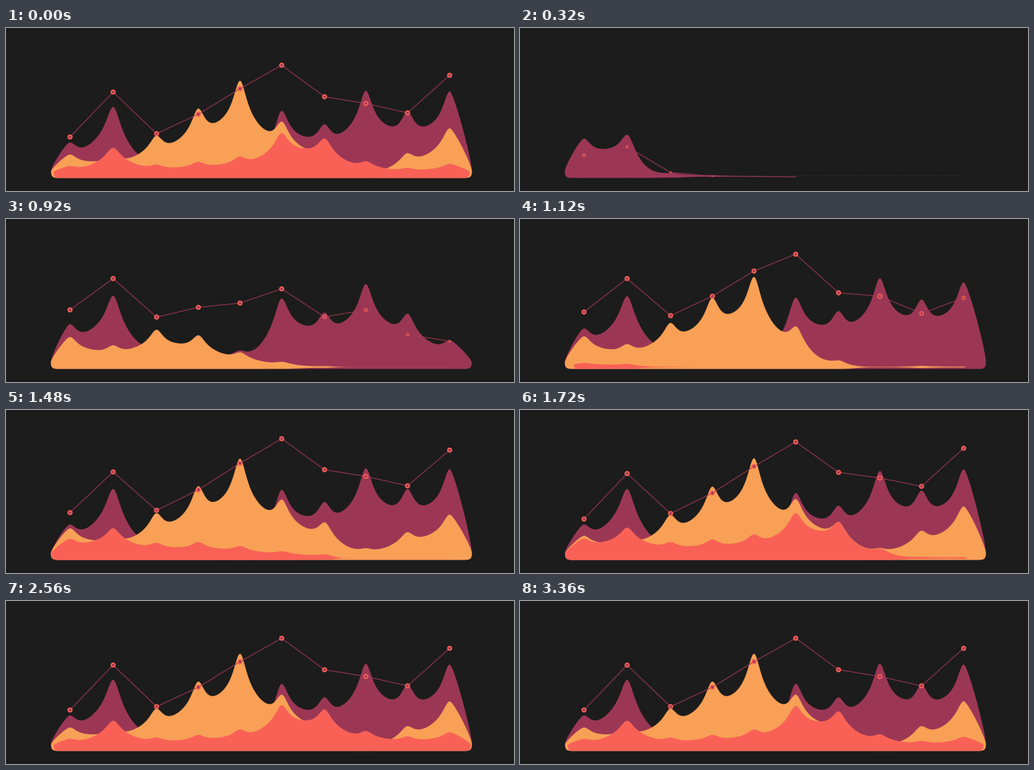
A matplotlib script that plays this animation: 754x243 px, repeating every 4360 ms.

```python
import numpy as np
import matplotlib.pyplot as plt
from matplotlib.animation import FuncAnimation
from matplotlib.patches import Circle, Polygon

W, H, DPI = 754, 243, 100
STEP, FRAMES = 40, 109
AXIS, FLOOR = 220, 223    # areas grow both ways from AXIS, down to FLOOR

BG, PLUM, ORANGE, CORAL = "#1c1c1c", "#9b3755", "#f8a055", "#f96156"

# chart data: one column per point
X = np.array([94.5, 158.5, 223, 285, 346.8, 408.7, 472.3, 533.6, 595.5, 658])
PLUM_H = np.array([50, 103, 28, 17, 18, 97, 77, 127, 96, 126])
ORANGE_H = np.array([32, 31, 60, 100.5, 142, 81, 47, 8, 34, 71])
CORAL_H = np.array([15, 42, 17, 21, 29, 64, 56, 22, 12, 18])
DOT_H = np.array([61, 128, 66, 95, 133, 168, 121, 111, 97, 153])

AREAS = [(PLUM, 0, PLUM_H), (ORANGE, 460, ORANGE_H), (CORAL, 930, CORAL_H)]
LAG = 80 * np.arange(10)              # each point starts 80 ms after the last
LIFT = np.r_[2, .5, np.ones(8)]       # relative overshoot of each point


def ramp(t, a, b):
    return np.clip((t - a) / (b - a), 0, 1)


def smooth(t, a, b):
    u = ramp(t, a, b)
    return u * u * (3 - 2 * u)


def grow(tau):
    """Slow creep, then a quick jump with a long tail."""
    late = (np.maximum(tau - 150, 0) / 90) ** 2.7
    return .17 * ramp(tau, -110, 160) + .83 * late / (1 + late)


def bezier(p0, p1, p2, p3, n=24):
    u = np.linspace(0, 1, n)[:, None]
    p0, p1, p2, p3 = map(np.array, (p0, p1, p2, p3))
    return ((1 - u) ** 3 * p0 + 3 * u * (1 - u) ** 2 * p1
            + 3 * u * u * (1 - u) * p2 + u ** 3 * p3)


def ridge(h, n=40):
    """Blend neighbouring peaks geometrically, with a dip between them."""
    u = np.linspace(0, 1, n, endpoint=False)
    s = smooth(u, 0, 1)
    v = np.sin(np.pi * u) ** 2
    dip = 1 - .31 * 1.4 * v / (v + .4)
    h = np.maximum(h, .02)
    xs = [a + (b - a) * u for a, b in zip(X, X[1:])]
    hs = [a ** (1 - s) * b ** s * dip for a, b in zip(h, h[1:])]
    return np.append(np.concatenate(xs), X[-1]), np.append(np.concatenate(hs), h[-1])


def underside(h):
    return AXIS + (FLOOR - AXIS) * (1 - np.exp(-h / 2))


def cap(x, h, reach, handle):
    """Rounded end of an area, from its last peak round to the floor."""
    e = 1 - np.exp(-h / 8)
    top, low = AXIS - h, underside(h)
    ex, ey = x + reach * e, AXIS - 7 * e
    side = np.sign(reach) * e
    slope = bezier((x, top), (x + handle * e, top),
                   (ex, ey - .15 * max(h - 7 * e, 0)), (ex, ey))
    corner = bezier((ex, ey), (ex, low), (ex - 4 * side, low),
                    (ex - 14 * side, low), 14)
    return np.vstack([slope, corner])


def area_outline(h):
    x, y = ridge(h)
    left = cap(X[0], h[0], -28.5, -6)
    right = cap(X[-1], h[-1], 33, 6)
    top = np.column_stack([x, AXIS - y])
    bottom = np.column_stack([x, underside(y)])[::-1]
    return np.vstack([top, right, bottom, left[::-1]])


def area_heights(t, delay, final):
    tau = t - delay - LAG
    peak = final + 7 * LIFT * (1 - ramp(tau, 980, 1280))
    return np.maximum(grow(tau) * (peak + 2) - 2, 0)


def dot_state(t):
    tau = t - LAG
    rise = .05 * ramp(tau, -120, 0) + .95 * smooth(tau, 40, 440)
    jump = smooth(tau, 360, 820)
    first = .25 * DOT_H + .55 * PLUM_H    # dots pause near the plum ridge
    peak = DOT_H + 13.5 * LIFT * (1 - ramp(tau, 1040, 1720))
    return FLOOR - (first * rise * (1 - jump) + peak * jump), ramp(tau, -120, 530)


fig = plt.figure(figsize=(W / DPI, H / DPI), dpi=DPI, facecolor=BG)
ax = fig.add_axes([0, 0, 1, 1])
ax.set_xlim(-.5, W - .5)    # whole numbers fall on pixel centres
ax.set_ylim(H - .5, -.5)
ax.axis("off")

shapes = [ax.add_patch(Polygon([(0, 0)] * 3, fc=color, lw=0, zorder=z))
          for z, (color, *_) in enumerate(AREAS)]
line, = ax.plot([], [], color=PLUM, lw=.8, zorder=5)
rims = [ax.add_patch(Circle((x, 0), 0, fc=CORAL, lw=0, zorder=6)) for x in X]
cores = [ax.add_patch(Circle((x, 0), 0, fc=PLUM, lw=0, zorder=7)) for x in X]


def draw(i):
    t = (i or FRAMES) * STEP    # opens on the finished chart
    for shape, (_, delay, final) in zip(shapes, AREAS):
        shape.set_xy(area_outline(area_heights(t, delay, final)))
    y, size = dot_state(t)
    shown = size > 0
    line.set_data(X[shown], y[shown])
    for rim, core, x, cy, s in zip(rims, cores, X, y, size):
        rim.center = core.center = (x, cy)
        rim.set_radius(3.8 * s)
        core.set_radius(1.9 * s)
    return [*shapes, line, *rims, *cores]


anim = FuncAnimation(fig, draw, frames=FRAMES, interval=STEP, repeat=True,
                     repeat_delay=0, blit=False)
plt.show()
```
